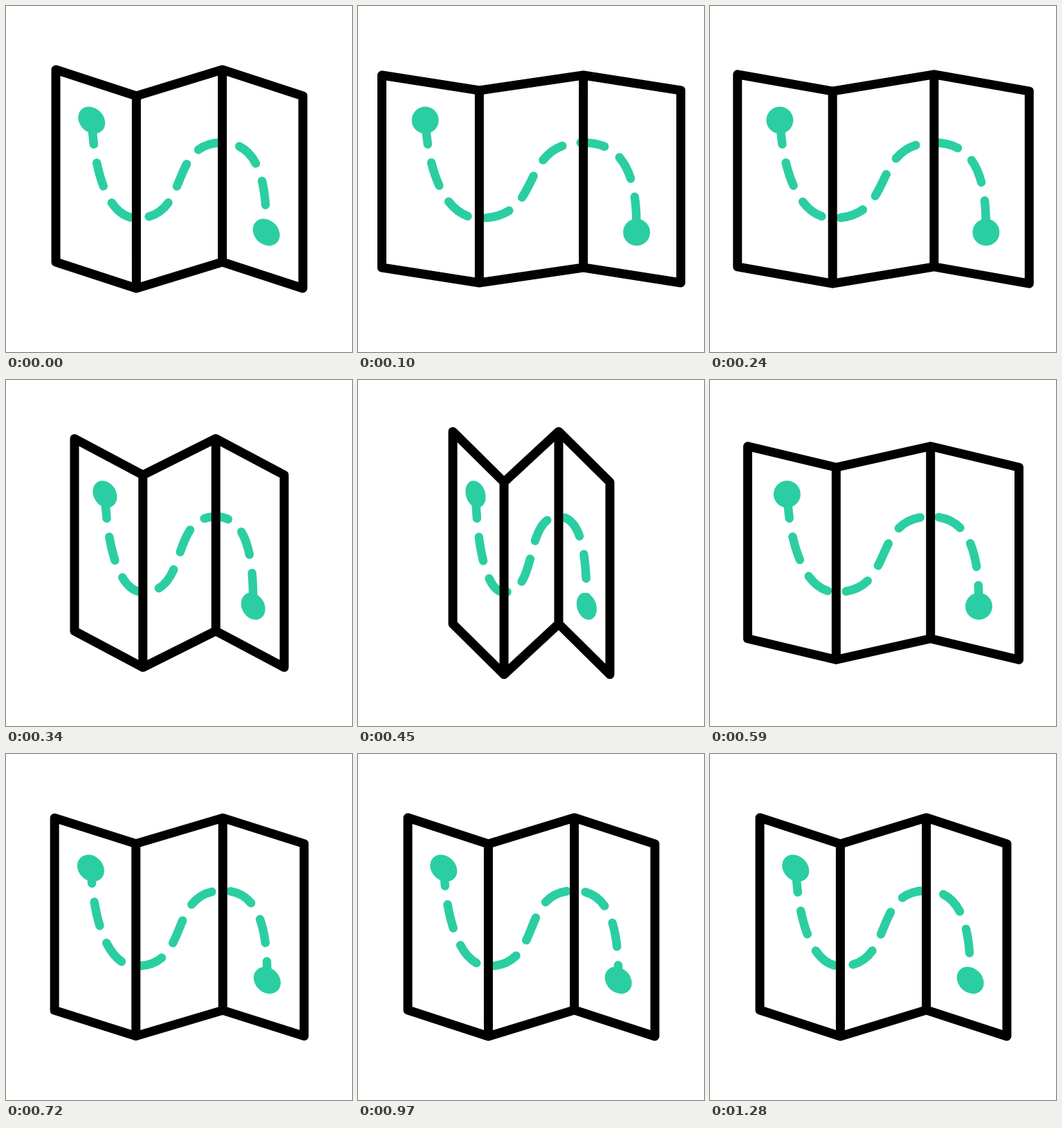
An HTML page with a canvas that plays this animation: 500x500 px, repeating every 1320 ms.

```html
<!DOCTYPE html>
<html lang="en">
<head>
<meta charset="utf-8">
<title>Folding map</title>
<style>
  html, body { margin: 0; width: 100%; height: 100%; overflow: hidden; background: #fff; }
  canvas { display: block; width: 100vmin; height: 100vmin; }
</style>
</head>
<body>
<canvas id="stage" width="500" height="500"></canvas>
<script>
const ctx = document.getElementById('stage').getContext('2d');

const LOOP = 1320, STEPS = 38, LAST = STEPS - 1;
const GREEN = '#2bcea2';
const CENTER = 250.5, REST = 178.5, FOLD = 0.348;
const DASH = [35, 27], PERIOD = 62;

// Half width of the map: [step, value]
const WIDTHS = [[0, REST], [3, 216], [5.5, 223], [10, 151.5], [12, 100],
                [13, 113.5], [17, 196], [22, REST], [LAST, REST]];

// Slope through the neighbours, flat at turning points and ends
function slope(keys, i) {
  const a = keys[i - 1], b = keys[i], c = keys[i + 1];
  if (!a || !c || (b[1] - a[1]) * (c[1] - b[1]) <= 0) return 0;
  return (c[1] - a[1]) / (c[0] - a[0]);
}

function curveAt(keys, t) {
  let i = 0;
  while (i < keys.length - 2 && t >= keys[i + 1][0]) i++;
  const [t0, v0] = keys[i], [t1, v1] = keys[i + 1];
  const d = t1 - t0, u = (t - t0) / d, u2 = u * u, u3 = u2 * u;
  return v0 + (v1 - v0) * (3 * u2 - 2 * u3)
    + d * slope(keys, i) * (u3 - 2 * u2 + u)
    + d * slope(keys, i + 1) * (u3 - u2);
}

function ease(t, from, to) {
  const u = Math.min(1, Math.max(0, (t - from) / (to - from)));
  return u * u * (3 - 2 * u);
}

function drawRoute(w, offset) {
  const x = v => CENTER + v * w / REST;
  ctx.strokeStyle = GREEN;
  ctx.lineWidth = 12.5;
  ctx.setLineDash(DASH);
  ctx.lineDashOffset = offset;
  ctx.beginPath();
  ctx.moveTo(x(-126.5), 165);
  ctx.bezierCurveTo(x(-124), 230, x(-106), 306.5, x(-62), 306.5);
  ctx.bezierCurveTo(x(18), 306.5, x(-18), 197.5, x(62), 197.5);
  ctx.bezierCurveTo(x(108), 197.5, x(127), 240, x(125.5), 327);
  ctx.stroke();
  ctx.setLineDash([]);
}

function drawPin(x, y, w) {
  const rx = 19.5 - Math.max(0, REST - w) * 0.075;
  const lean = 4 * Math.min(1, Math.max(0, (196 - w) / (196 - REST)));
  const ry = Math.sqrt(19.5 ** 2 - lean ** 2);
  ctx.save();
  ctx.transform(rx, lean, 0, ry, x, y);
  ctx.beginPath();
  ctx.arc(0, 0, 1, 0, Math.PI * 2);
  ctx.restore();
  ctx.fillStyle = GREEN;
  ctx.fill();
}

function drawMap(w) {
  const tilt = 19 + (REST - w) * (w > REST ? 0.213 : 0.271);
  const top = [-1, -FOLD, FOLD, 1].map((k, i) =>
    [CENTER + k * w, 111 + (i % 2 ? tilt : -tilt)]);
  const bottom = top.map(([x, y]) => [x, y + 278]);
  ctx.strokeStyle = '#000';
  ctx.lineWidth = 13;
  ctx.beginPath();
  [...top, ...bottom.slice().reverse()].forEach(p => ctx.lineTo(...p));
  ctx.closePath();
  for (const i of [1, 2]) {
    ctx.moveTo(...top[i]);
    ctx.lineTo(...bottom[i]);
  }
  ctx.stroke();
}

function draw(step) {
  const w = curveAt(WIDTHS, step);
  ctx.fillStyle = '#fff';
  ctx.fillRect(0, 0, 500, 500);
  ctx.lineCap = ctx.lineJoin = 'round';
  drawRoute(w, 2 * PERIOD * ease(step, 17, LAST));
  drawPin(CENTER - 0.71 * w, 165, w);
  drawPin(CENTER + 0.704 * w, 327, w);
  drawMap(w);
}

const start = performance.now();

function tick() {
  const t = (performance.now() - start) % LOOP;
  draw(Math.min(LAST, Math.floor((t + 12) * STEPS / LOOP)));
  requestAnimationFrame(tick);
}
tick();
</script>
</body>
</html>
```
